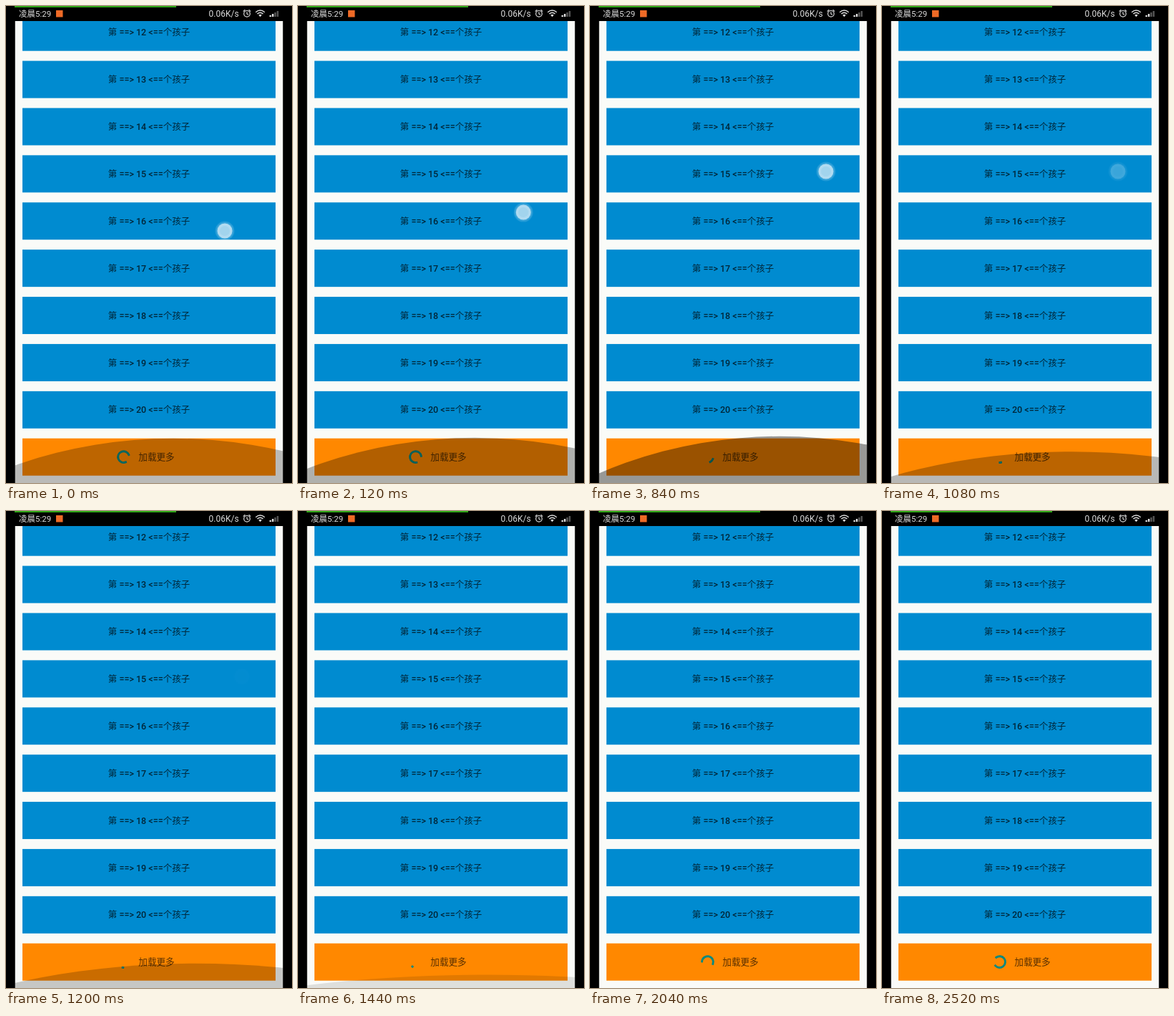
Animation, 400 px wide and 666 px high, one loop 2.64 s. Source, as an HTML page:

```html
<!DOCTYPE html>
<html lang="zh">
<head>
<meta charset="utf-8">
<style>
  html, body { margin: 0; width: 100%; height: 100%; overflow: hidden; background: #000; }
  svg { display: block; width: 400px; height: 666px; }
  text { font-family: Roboto, "Noto Sans CJK SC", "Noto Sans CJK", sans-serif; }
  .row { font-size: 12.5px; font-weight: 500; text-anchor: middle; fill: #000; fill-opacity: .73; }
  .cjk { font-weight: 400; }
  .status { font-size: 11.5px; fill: #dcdcdc; }
  .line { fill: none; stroke: #dcdcdc; stroke-width: 1.2; }
</style>
</head>
<body>
<svg viewBox="0 0 400 666">
  <defs>
    <clipPath id="panel"><rect x="12.5" y="21" width="375" height="645"/></clipPath>
  </defs>
  <rect width="400" height="666" fill="#000"/>
  <g clip-path="url(#panel)">
    <rect x="12.5" y="21" width="375" height="645" fill="#fafbf8"/>
    <g id="rows"></g>
    <rect x="23" y="603.7" width="354" height="52" fill="#ff8800"/>
    <text x="185.3" y="634.3" font-size="12.6" fill="#000" fill-opacity=".66">加载更多</text>
    <path id="ring" fill="none" stroke="#07897f" stroke-width="2.9" stroke-linecap="square"/>
    <ellipse id="glow" rx="562.5" fill="#000"/>
  </g>

  <rect x="12" width="226" height="2" fill="#2fa516"/>
  <text class="status" x="18" y="14.8">凌晨5:29</text>
  <rect x="70" y="6" width="9.5" height="9.5" fill="#ee6a26"/>
  <text class="status" x="283.5" y="14.8" font-size="12" style="font-size:12px">0.06K/s</text>
  <g class="line">
    <circle cx="337" cy="10.8" r="4.3"/>
    <path d="M337 8.3V11l2 1.2M331.8 7.6l2.6-2.4M342.2 7.6l-2.6-2.4"/>
    <path d="M349.2 8.7q6.3-5.4 12.6 0M351.4 11q4.1-3.4 8.2 0" stroke-width="1.5"/>
  </g>
  <path d="M353.2 12.6q2.3-1.7 4.6 0l-2.3 2.6z" fill="#dcdcdc"/>
  <g id="bars"></g>

  <g id="touch">
    <circle r="13.5" fill="#fff" fill-opacity=".13"/>
    <circle r="12" fill="#fff" fill-opacity=".12"/>
    <circle r="10.5" fill="#fff" fill-opacity=".6"/>
    <circle r="7" fill="#8ccbe8" fill-opacity=".4"/>
  </g>
</svg>
<script>
const LOOP = 2640, STEP = 120, RELEASE = 855, RECEDE = 1250;
const SPIN = 2666, SPIN_ZERO = 1420;
const $ = id => document.getElementById(id);
const clamp = v => Math.min(1, Math.max(0, v));

let rows = '';
for (let i = 0; i < 9; i++) {
  const y = 10.7 + 65.89 * i;
  rows += `<rect x="23" y="${y}" width="354" height="52" fill="#008bd0"/>` +
    `<text class="row" x="200" y="${y + 30.6}"><tspan class="cjk">第</tspan> ==&gt; ${12 + i} &lt;==` +
    `<tspan class="cjk">个孩子</tspan></text>`;
}
$('rows').innerHTML = rows;

$('bars').innerHTML = [2, 4, 6, 8].map((h, i) =>
  `<rect x="${368.5 + i * 3.4}" y="${15 - h}" width="2.5" height="${h}" fill="${i < 2 ? '#dcdcdc' : '#555'}"/>`
).join('');

// Eased y for a cubic with control heights 0, 0, 1, 1 and the given x controls
function ease(x, x0, x1, x2, x3) {
  if (x <= x0) return 0;
  if (x >= x3) return 1;
  let lo = 0, hi = 1;
  for (let i = 0; i < 24; i++) {
    const s = (lo + hi) / 2, r = 1 - s;
    const bx = r * r * r * x0 + 3 * r * r * s * x1 + 3 * r * s * s * x2 + s * s * s * x3;
    if (bx < x) lo = s; else hi = s;
  }
  return lo * lo * (3 - 2 * lo);
}

function drawRing(t) {
  const turns = (t - SPIN_ZERO) / SPIN;
  const q = turns - Math.floor(turns);
  const base = 122 + 270 * q + (turns < 0 ? -180 : 0);
  const from = base + 270 * ease(q, .5, .7, .6, 1);
  const to = Math.max(base + 270 * ease(q, 0, .2, .1, .5), from + 1);
  const at = deg => {
    const a = deg * Math.PI / 180;
    return `${164.5 + 7.9 * Math.cos(a)} ${629.6 + 7.9 * Math.sin(a)}`;
  };
  $('ring').setAttribute('d', `M${at(from)}A7.9 7.9 0 ${to - from > 180 ? 1 : 0} 1 ${at(to)}`);
}

function drawGlow(t, left) {
  const p = clamp((t - RELEASE) / RECEDE), fade = (1 - p) ** 2;
  const k = left ** 2.3;
  const scale = (.866 - .04 * k) * fade;
  const glow = $('glow');
  glow.setAttribute('cx', 265 - 31 * left ** 3.5);
  glow.setAttribute('cy', 666 + (562.5 - 75.3) * scale);
  glow.setAttribute('ry', 562.5 * scale);
  glow.setAttribute('fill-opacity', (.395 - .135 * k) * fade);
}

function drawTouch(t, left) {
  const x = 330 - 24 * left ** 3, y = 231 + 83 * left ** 2.3;
  $('touch').setAttribute('transform', `translate(${x} ${y})`);
  $('touch').setAttribute('opacity', 1 - clamp((t - RELEASE) / 350));
}

function draw(t) {
  const left = 1 - clamp(t / 800);
  drawRing(t);
  drawGlow(t, left);
  drawTouch(t, left);
}

const start = performance.now();
function tick() {
  const t = (performance.now() - start) % LOOP;
  draw(Math.floor(t / STEP) * STEP);
  requestAnimationFrame(tick);
}
draw(0);
requestAnimationFrame(tick);
</script>
</body>
</html>
```
